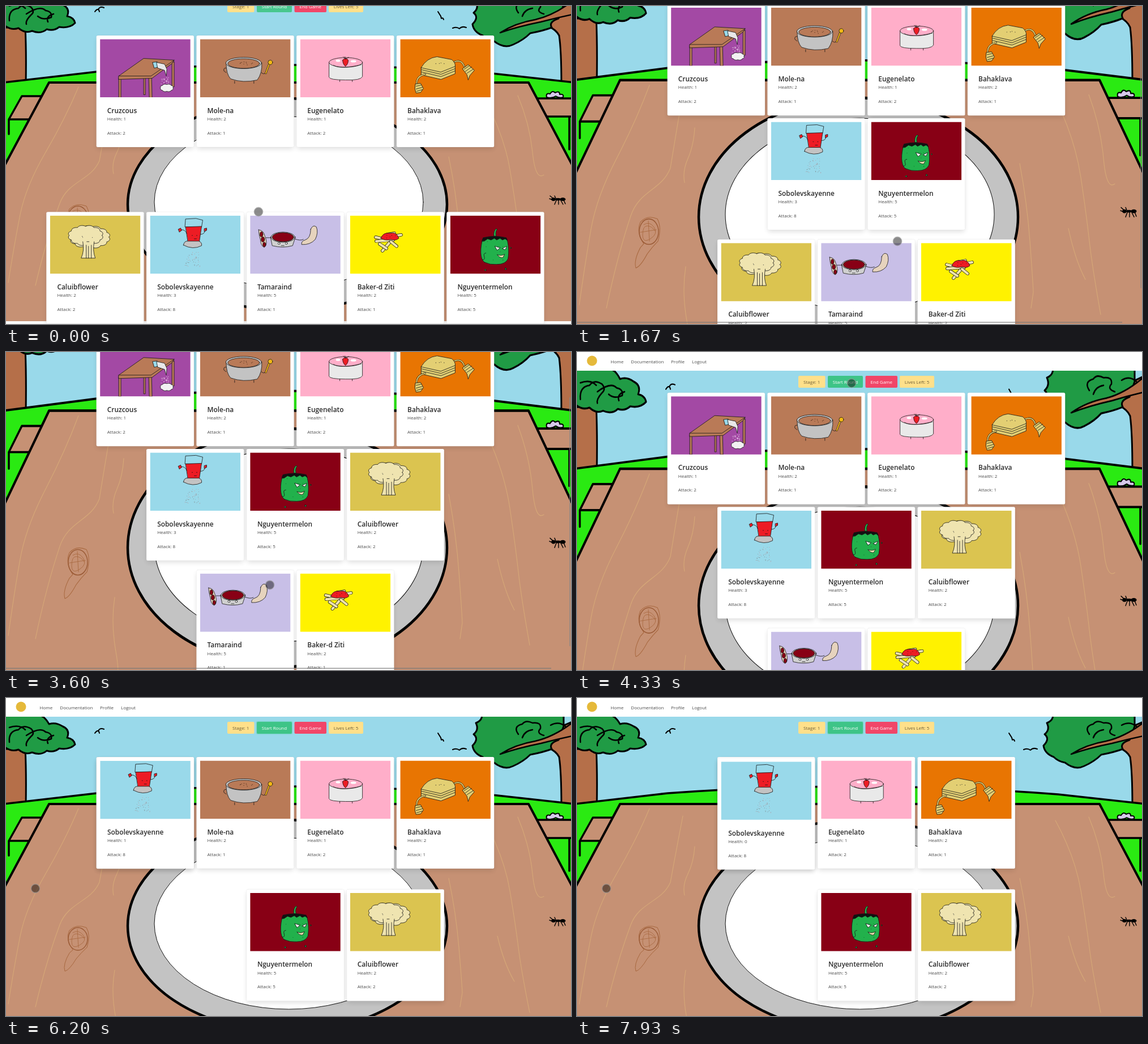
These frames come from a looping animation (998 px wide and 561 px high, 8 s). An HTML page:

```html
<!DOCTYPE html>
<html lang="en">
<head>
<meta charset="utf-8">
<title>Card table</title>
<style>
html, body { margin: 0; width: 100%; height: 100%; overflow: hidden; background: #fff; }
#stage { display: block; width: 100vw; height: 100vh; font: 8px "Open Sans", "Noto Sans", sans-serif; }
text { fill: #4a4a4a; white-space: pre; }
.name { font-size: 11.9px; font-weight: 600; fill: #2b2b2b; }
.link { fill: #485fc7; }
.strong { font-weight: 700; fill: #363636; }
</style>
</head>
<body>
<svg id="stage" viewBox="0 0 998 561" preserveAspectRatio="none"></svg>
<script>
const LOOP = 8000;
const SKY = '#99d9ea', WOOD = '#c69174', BROWN = '#b97a57', RED = '#ed1c24', DARK = '#880015',
  CREAM = '#efe4b0', GRAY = '#c3c3c3', LEAF = '#209b45', GRASS = '#2aea12', POD = '#e6d3bd', HONEY = '#e3cf73',
  BARK = '#b56f49', GREEN = '#22b14c';

let seed = 7;
const rand = () => (seed = seed * 16807 % 2147483647) / 2147483647;

// Drawing helpers, all return SVG markup
const path = (d, fill = 'none', stroke = '#161616', w = .8) =>
  `<path d="${d}" fill="${fill}" stroke="${stroke}" stroke-width="${w}"/>`;
const oval = (x, y, rx, ry, fill, w = .8, stroke = '#161616') =>
  `<ellipse cx="${x}" cy="${y}" rx="${rx}" ry="${ry}" fill="${fill}" stroke="${stroke}" stroke-width="${w}"/>`;
const rect = (x, y, w, h, fill, extra = '') =>
  `<rect x="${x}" y="${y}" width="${w}" height="${h}" fill="${fill}" ${extra}/>`;
const text = (x, y, s, extra = '') => `<text x="${x}" y="${y}" ${extra}>${s}</text>`;

function blob(cx, cy, rx, ry, n, fill) {
  let d = '';
  for (let i = 0; i <= n; i++) {
    const a = i / n * 2 * Math.PI, x = cx + rx * Math.cos(a), y = cy + ry * Math.sin(a);
    d += i ? `A${rx / n * 3.6} ${ry / n * 4} 0 0 1 ${x} ${y}` : `M${x} ${y}`;
  }
  return path(d + 'Z', fill);
}
function dots(x, y, w, h, n, colors, r = .6) {
  let s = '';
  for (let i = 0; i < n; i++)
    s += oval(x + rand() * w, y + rand() * h, r, r, colors[i % colors.length], 0);
  return s;
}
const stick = d => path(d, 'none', '#161616', 5.6) + path(d, 'none', CREAM, 4.2);

const art = {
  table: () => path('M33 68V103H37V68ZM86 68l1 35h5l-1-38ZM77 68v30h3V66ZM127 42v42h4V40Z', BROWN)
    + path('M33 65L77 34L131 37L127 43L92 69L33 71Z', BROWN) + path('M33 65H90L131 37')
    + path('M93 41l8-1 3 9-8 2Z', SKY) + path('M100 41l14 3 4 9-1 12-3-10-12-4Z', '#e8e8e8')
    + dots(108, 67, 14, 13, 26, ['#f0d8f0']) + blob(118, 86, 11, 6, 8, '#f2f2f2'),
  pot: () => path('M46 42Q46 62 54 70Q76 78 101 72Q110 60 109 42Z', GRAY) + oval(77, 42, 31.5, 10, GRAY)
    + oval(77, 43, 28, 8.5, BROWN) + path('M46 51Q41 50 42 56l4 3M108 59q6 5 8-1M61 74v4M95 74v4')
    + path('M116 60L122 44', 'none', '#161616', 3.2) + path('M116 60L122 44', 'none', '#f5b914', 2)
    + oval(124, 41, 4, 4, '#f5b914') + dots(58, 39, 38, 7, 10, ['#4a2a18']),
  cake: () => path('M51 41V67Q52 72 80 72Q107 73 110 66V41Z', '#e9e9e9') + oval(80.5, 41, 29.5, 8.5, '#ffaec9')
    + path('M70 72v3M92 72v3M59 46Q70 54 108 45') + oval(67, 38, 4, 2, '#fff', 0) + oval(94, 39, 5, 2, '#fff', 0)
    + path('M75 37Q80 31 85 37Q85 44 80 48Q75 44 75 37Z', RED) + path('M80 35L76 31M80 35l-1-4M80 35l6-3'),
  slab: () => path('M37 50V63L72 71L97 61V47Z', HONEY) + path('M37 50Q47 33 65 31L91 36Q98 42 97 48L72 58Z', HONEY)
    + path('M38 54L72 62 97 52M38 58L72 66 97 56') + path('M44 62Q29 65 29 78M96 40Q108 35 113 48', 'none', '#161616', 3)
    + path('M44 62Q29 65 29 78M96 40Q108 35 113 48', 'none', HONEY, 1.8)
    + path('M27 79L36 78L41 87 36 94 28 95 26 88Z', HONEY) + path('M110 52L120 45L131 55L123 64L120 72L118 63Z', HONEY)
    + path('M28 83l9-2M28 88l11-3M29 92l10-3M113 53l9-6M115 57l11-8M118 60l11-7') + dots(55, 40, 24, 8, 4, ['#222']),
  cauli: () => blob(70, 38, 34, 18, 13, CREAM) + blob(63, 35, 29, 16, 12, CREAM)
    + path('M58 46Q61 62 55 75H80Q75 62 78 46', CREAM) + path('M64 52v23M68 54v21M73 52v23M65 46h4')
    + dots(55, 35, 25, 4, 3, ['#444']),
  shaker: () => path('M63 6L81 5 93 8 91 20H62Z', SKY) + path('M63 20L91 19L87 46H67Z', RED)
    + path('M59 52Q60 44 68 45H86Q92 47 91 53 76 61 59 52Z', GRAY) + path('M55 25Q62 24 65 32M89 33Q96 33 97 27')
    + path('M50 24l4-2 2 4-4 3ZM96 23l4-1v4l-4 2Z', RED) + path('M74 35h1M82 35h1M78 41h4')
    + dots(62, 64, 26, 26, 44, ['#8a9aa5', '#d08a90', '#777'], .5),
  pods: () => path('M15 25Q24 26 26 36Q32 50 25 56Q19 54 18 42Q15 32 15 25Z', POD)
    + oval(20, 33, 2.6, 4.5, DARK) + oval(22.5, 42, 3, 4.5, DARK) + oval(25, 51, 2.6, 4, DARK)
    + path('M36 38L39 53Q58 58 75 53L80 38Z', '#d0d0d0') + oval(58, 38, 21, 9, '#d0d0d0') + oval(58, 38, 19, 8, DARK)
    + oval(51, 49, 1.8, 1.8, '#fff') + oval(64, 49, 1.8, 1.8, '#fff') + path('M55 53h5M37 39H28M79 41Q88 45 94 42')
    + path('M107 24Q111 15 117 20Q121 30 115 42Q106 52 91 51Q90 45 97 43Q107 40 107 24Z', POD),
  ziti: () => ['M45 38L70 44', 'M46 45L76 43', 'M57 62L70 47', 'M52 50L64 58', 'M72 46L82 54', 'M66 38L90 34', 'M66 33L78 31']
    .map(stick).join('') + path('M54 40Q58 29 70 31Q82 28 86 40Q80 45 72 42Q62 45 54 40Z', RED) + dots(62, 34, 18, 6, 5, ['#5a0a0a']),
  pepper: () => path('M57 42C53 56 52 76 60 82Q70 87 82 86Q98 86 102 76C104 62 103 52 100 41Q78 34 57 42Z', GREEN)
    + path('M77 36Q76 27 81 23l2 1Q79 29 81 36Z', GREEN)
    + path('M56 45L58 39Q78 34 99 39L101 44 97 41 92 43 88 40 82 43 78 40 72 43 66 41 60 45Z', '#111')
    + path('M79 54l9 3-5 4ZM92 58l8-4-3 6Z', '#fff') + path('M83 69q7 3 13-1l-3 6q-6 1-10-5Z', CREAM)
    + path('M63 66q-5 0-3 6t-3 6M60 82l1 1M97 92v3') + oval(62, 96, 1.4, 1.4, GREEN) + oval(98, 94, 1.4, 1.4, GREEN)
    + oval(107, 57, 1, 1, GREEN) + dots(63, 46, 34, 36, 10, ['#114d22'], .5)
};

// name, health, attack, colour, picture; the fighter comes last so that it stays on top
const deck = {
  cruz: ['Cruzcous', 1, 2, '#a349a4', 'table'],
  mole: ['Mole-na', 2, 1, BROWN, 'pot'],
  euge: ['Eugenelato', 1, 2, '#ffaec9', 'cake'],
  baha: ['Bahaklava', 2, 1, '#e87502', 'slab'],
  calu: ['Caluibflower', 2, 2, '#dbc450', 'cauli'],
  tama: ['Tamaraind', 5, 1, '#c8bfe7', 'pods'],
  ziti: ['Baker-d Ziti', 2, 1, '#fff200', 'ziti'],
  nguy: ['Nguyentermelon', 5, 5, DARK, 'pepper'],
  sobo: ['Sobolevskayenne', 3, 8, SKY, 'shaker']
};
const card = (id, [name, health, attack, color, pic]) => `<g id="${id}">`
  + rect(1, 5, 170.4, 195, '#0a0a0a', 'rx="3" opacity=".13" filter="url(#soft)"')
  + rect(0, 0, 172.4, 197, '#fff', 'rx="2.5" stroke="#0a0a0a" stroke-opacity=".04"')
  + `<svg x="6.5" y="6.5" width="159.5" height="102.5">${rect(0, 0, 160, 103, color)}${art[pic]()}</svg>`
  + text(19.2, 136.7, name, 'class="name"') + text(19.2, 150, 'Health: ' + health, 'class="hp"')
  + text(19.2, 174.7, 'Attack: ' + attack) + '</g>';

const grain = ['M128 195Q105 250 70 310T25 420T4 540', 'M187 208Q175 270 165 325C150 360 110 360 95 400S65 490 52 545',
  'M208 262Q206 290 196 310T190 348', 'M192 480Q185 520 194 565T190 600', 'M845 216Q880 280 890 340T905 440T925 555',
  'M904 210Q925 260 930 310T950 350', 'M782 318Q795 380 800 440T806 520L802 545', 'M868 420Q880 470 898 500'];

const backdrop = () => rect(0, 0, 998, 190, SKY)
  + path('M-5 90H34Q36 130 35 190H-5Z', BARK, '#000', 3)
  + path('M958 60L1005 40V190H981Q981 130 977 104Q972 94 958 88Z', BARK, '#000', 3)
  + path('M-5 20V84Q8 96 22 91Q34 101 46 96Q62 102 72 93Q84 97 94 89Q112 92 122 82Q120 72 108 70Q114 56 100 50Q88 42 76 46Q66 28 52 30V20Z', LEAF, '#000', 3)
  + path('M6 78Q4 58 22 56Q30 46 44 54Q52 62 44 68Q34 78 36 84M36 66Q60 50 70 60Q82 62 80 72Q66 78 56 70M84 66q-14 4-10 14M6 52Q24 46 34 56', 'none', '#000', 2.5)
  + path('M838 20Q846 38 830 44Q836 56 826 64Q836 72 824 84Q826 98 842 104Q850 112 862 114Q880 128 896 120Q914 112 926 100Q948 96 964 90Q958 80 976 74L985 50V20Z', LEAF, '#000', 3)
  + path('M873 99Q900 82 935 76Q970 68 1005 40V66Q975 72 945 80Q905 88 873 99Z', BARK, '#000', 2.5)
  + path('M905 64Q895 50 912 46Q918 38 930 44Q946 42 944 54Q936 62 950 66M930 56q-14 2-18 14M962 48q14-8 26 2', 'none', '#000', 2.5)
  + path('M157 62Q161 56 164 59L165 62M163 58Q166 52 173 55M763 62l5 8 1 4q3-2 4 2M789 91q7-3 12 1 4-5 12-2', 'none', '#000', 2)
  + path('M-5 187L160 168Q500 143 850 170L1005 187V650H-5Z', GRASS, '#000', 3.5)
  + path('M28 211H68L46 252H5ZM5 252V278', WOOD, '#000', 3.5)
  + path('M930 215H1003V247H944ZM995 247V305', WOOD, '#000', 3.5)
  + path('M955 213q-2-8 6-6 4-7 9-2 8-4 8 3 8-1 6 5-7 2-13-2-8 5-16 2Z', '#d6c9ea', '#000', 2)
  + path('M76 187H923L1003 338V650H-5V338Z', WOOD, '#000', 4)
  + path(grain.join(''), 'none', '#d6a878', 1.1)
  + path('M118 444Q104 426 112 410Q124 398 142 405Q150 418 143 440Q132 450 124 460Q112 480 104 482Q100 470 112 450Z', 'none', '#a8683f', 1)
  + oval(127, 425, 17, 20, 'none', 1.4, '#9a5a35') + path('M118 414q10-6 18 4t-6 18-14-6 8-14 14 8M112 426l28-4M126 408l2 32', 'none', '#a8683f', .8)
  + path('M961 387l5 4M960 392l6 2M972 395l-3 7M976 395v7M980 395l4 7M985 394l3 7M971 391l-2-4', 'none', '#000', 1.4)
  + oval(967, 393, 3.8, 3, '#000', 0) + oval(975, 393, 5, 2.2, '#000', 0) + oval(983.5, 393, 5, 3, '#000', 0)
  + oval(497, 402, 282, 187, GRAY, 4.5, '#000') + oval(499.5, 398, 237.5, 151, '#fff', 1, '#111');

const button = (x, w, label, fill, ink, id) => rect(x, 42, w, 21, fill, `rx="2" ${id ? `id="${id}"` : ''}`)
  + text(x + w / 2, 55.5, label, `text-anchor="middle" style="fill:${ink}"`);
const link = s => `<tspan class="link">${s}</tspan>`;

const stage = document.getElementById('stage');
stage.innerHTML = '<defs><filter id="soft" x="-20%" y="-20%" width="140%" height="140%"><feGaussianBlur stdDeviation="4"/></filter></defs>'
  + '<g id="page" stroke-linejoin="round" stroke-linecap="round">'
  + `<g id="scene">${backdrop()}</g>`
  + `<g id="footer">${rect(0, 0, 998, 400, '#fafafa')}${text(287, 35, '<tspan class="strong">Platter Skirmish</tspan> by '
    + link('Felix Du') + ', ' + link('Felix Tarnh') + ', ' + link('Corin Paldew') + ', and ' + link('Todd Mavelo')
    + '. The source code is licensed through ' + link('VRL') + '.')}</g>`
  + rect(0, -10, 998, 43, '#fff') + '<circle cx="26.5" cy="15.5" r="9" fill="#e5b93a"/>'
  + text(59.5, 19.8, 'Home') + text(95.3, 19.8, 'Documentation') + text(166, 19.8, 'Profile') + text(203, 19.8, 'Logout')
  + button(391, 47.5, 'Stage: 1', '#ffe08a', '#6b5d38') + button(443, 62, 'Start Round', '#48c78e', '#fff', 'start')
  + button(509.5, 56.5, 'End Game', '#f14668', '#fff') + button(570, 61, 'Lives Left: 5', '#ffe08a', '#6b5d38')
  + Object.entries(deck).map(e => card(...e)).join('') + '</g>'
  + `<g id="bars" opacity=".6">${rect(0, 557, 963, 2, '#777')}${rect(995, 0, 2, 439, '#888', 'id="thumb"')}</g>`
  + '<circle id="pointer" r="7.6" fill="#000" fill-opacity=".45" stroke="#999" stroke-opacity=".55" stroke-width="1.6"/>';

const $ = id => document.getElementById(id);
const ui = Object.fromEntries(['page', 'scene', 'footer', 'start', 'bars', 'thumb', 'pointer', ...Object.keys(deck)].map(id => [id, $(id)]));
const hp = ui.sobo.querySelector('.hp');

const clamp = v => Math.max(0, Math.min(1, v));
const ease = (t, a, b) => { const p = clamp((t - a) / (b - a)); return p * p * (3 - 2 * p); };
const move = (el, x, y) => el.setAttribute('transform', `translate(${x} ${y})`);

const trail = [[0, 446, 363], [50, 446, 363], [380, 385, 425], [600, 367, 442], [780, 367, 442], [1130, 794, 513],
  [1330, 794, 513], [1670, 566, 415], [2200, 545, 418], [2530, 345, 441], [2680, 345, 441], [3270, 462, 426],
  [3470, 464, 418], [3600, 466, 411], [4270, 485, 55], [4530, 485, 55], [5330, 56, 340], [5450, 56, 340], [5800, 52, 336]];
function pointerAt(t) {
  const i = trail.findIndex(k => k[0] > t);
  if (i < 0) return trail[trail.length - 1].slice(1);
  const [t0, x0, y0] = trail[i - 1], [t1, x1, y1] = trail[i], p = ease(t, t0, t1);
  return [x0 + (x1 - x0) * p, y0 + (y1 - y0) * p];
}

function scrollAt(t) {
  if (t < 3460) return 52 + 104 * ease(t, 1468, 2130);
  return 156 * Math.pow(1 - clamp((t - 3460) / 810), 2.2);
}

// Rows of cards: enemies, played cards, hand
const foes = ['cruz', 'mole', 'euge', 'baha'];
const phases = [
  [0, foes, [], ['calu', 'sobo', 'tama', 'ziti', 'nguy']],
  [400, foes, ['sobo'], ['calu', 'tama', 'ziti', 'nguy']],
  [1325, foes, ['sobo', 'nguy'], ['calu', 'tama', 'ziti']],
  [2665, foes, ['sobo', 'nguy', 'calu'], ['tama', 'ziti']],
  [4530, foes, ['sobo', 'nguy', 'calu'], []],
  [6665, foes.slice(1), ['sobo', 'nguy', 'calu'], []]
];
const PITCH = 176.75;

function draw(t) {
  const [, top, mid, hand] = phases.filter(p => p[0] <= t).pop();
  const tall = mid.length > 0 && hand.length > 0;
  const scroll = scrollAt(t), bottom = tall ? 679 : 608;

  move(ui.page, 0, -scroll);
  ui.scene.setAttribute('transform', `translate(0 33) scale(1 ${(bottom - 33) / 575}) translate(0 -33)`);
  move(ui.footer, 0, bottom);

  for (const id in deck) ui[id].style.display = 'none';
  const layRow = (ids, y) => ids.forEach((id, i) => {
    ui[id].style.display = '';
    move(ui[id], 511 + PITCH * (i - ids.length / 2) + 2.1, y);
  });
  layRow(top, tall ? 71.7 : 104);
  layRow(mid, tall ? 273.3 : 337.5);
  layRow(hand, tall ? 487 : 415.3);

  // Two strikes: up to the first enemy and back
  const hit1 = ease(t, 6020, 6205) - ease(t, 6460, 6670);
  const hit2 = ease(t, 7510, 7730) - ease(t, 7920, 8130);
  if (t >= 4530) move(ui.sobo, 248 - PITCH / 2 * hit1, 337.5 - 233.5 * (hit1 + hit2));
  hp.textContent = 'Health: ' + (t < 6195 ? 3 : t < 7725 ? 1 : 0);

  const focused = t >= 4530;
  ui.start.setAttribute('fill', t > 4200 ? '#3ec487' : '#48c78e');
  ui.start.setAttribute('stroke', focused ? '#48c78e' : 'none');
  ui.start.setAttribute('stroke-opacity', .3);
  ui.start.setAttribute('stroke-width', 2.5);

  ui.bars.style.display = t > 1460 && t < 2190 || t > 3465 && t < 4325 ? '' : 'none';
  ui.thumb.setAttribute('y', scroll * .78);
  move(ui.pointer, ...pointerAt(t));
}

function tick() {
  draw(performance.now() % LOOP);
  requestAnimationFrame(tick);
}
tick();
</script>
</body>
</html>
```
